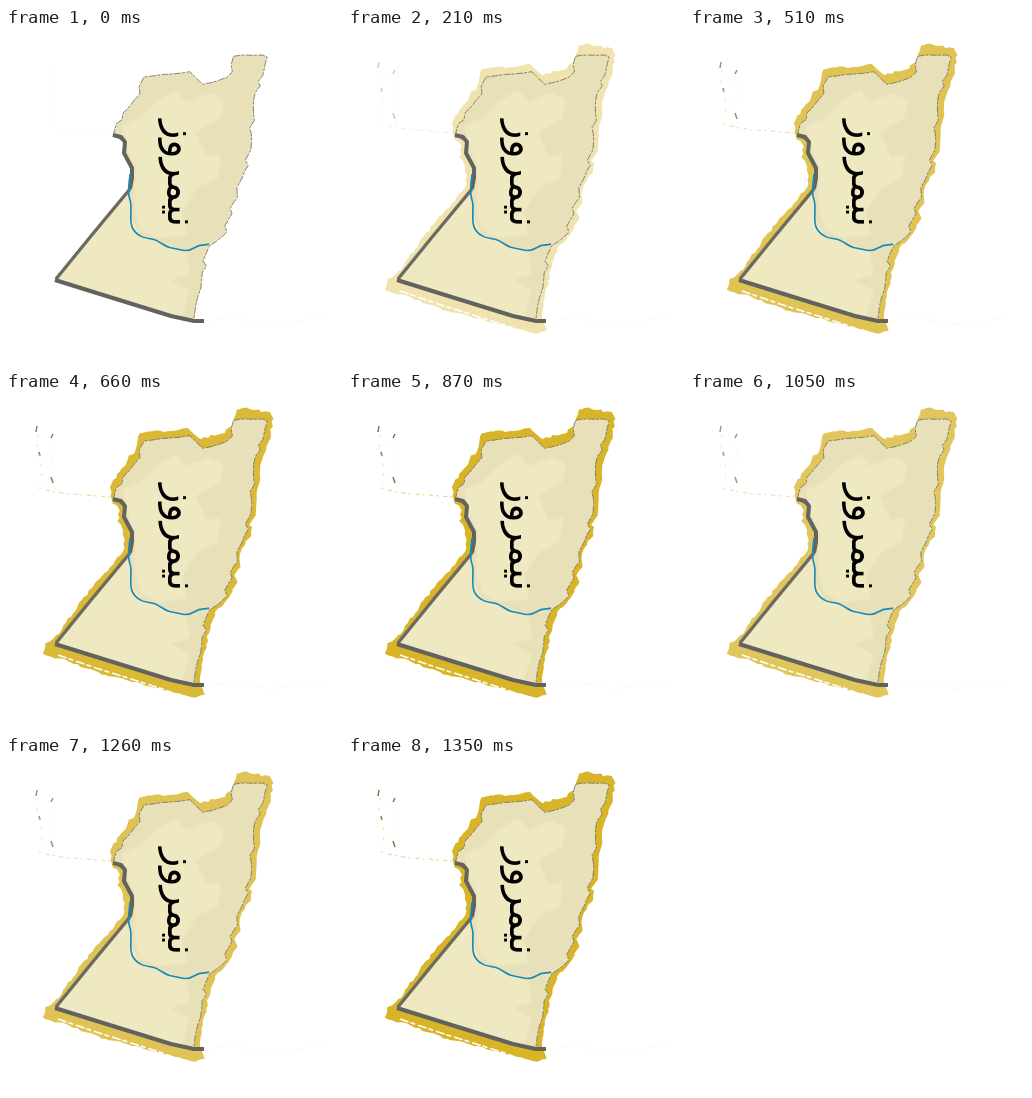
Animation, 336 px wide and 336 px high, one loop 1.42 s. Source, as an HTML page:

```html
<!DOCTYPE html>
<html lang="fa">
<head>
<meta charset="utf-8">
<style>
html, body { margin: 0; width: 100%; height: 100%; overflow: hidden; background: #fff; }
svg { display: block; width: 100vw; height: 100vh; }
text { font-family: "DejaVu Sans", sans-serif; font-size: 40px; }
</style>
</head>
<body>
<svg viewBox="0 0 336 336" fill="none" stroke-linejoin="round">
  <defs>
    <clipPath id="clip"><path class="land"/></clipPath>
    <filter id="soft"><feGaussianBlur stdDeviation="0.8"/></filter>
  </defs>
  <g stroke="#fbf9f2" stroke-width="1.2">
    <path d="M47 42L43 50L47 60L45 77L49 100L62 102L78 101L92 105L107 104" stroke-dasharray="5 4"/>
    <path d="M198 293L230 290L262 297L288 294L318 289" stroke-dasharray="8 5"/>
  </g>
  <g id="glow">
    <path id="halo" fill="#d8b428"/>
    <g stroke="#c9a53a" stroke-width="1.1">
      <path d="M31 34L30 40M47 42L45 46M33 60L34 64M45 85L47 91" stroke="#8d7440" stroke-width="1.5"/>
      <path d="M33 96L44 99L62 102L80 103L104 105" stroke="#ead592" stroke-dasharray="2 5 4 3"/>
      <path d="M32 42L31 56L36 76L35 92" stroke="#f0e2b6" stroke-dasharray="3 7"/>
    </g>
  </g>
  <path d="M52 263L90 276L125 287L160 298" stroke="#fff" stroke-width="1.6" stroke-dasharray="9 2 5 3"/>
  <path class="land" fill="#e8e0b8"/>
  <g clip-path="url(#clip)">
    <path d="M124 160L125 190L135 208L178 222L203 217L196 245L190 294L50 252Z" fill="#eee9c1"/>
    <path d="M116 98L135 90L150 74L170 62L180 74L204 65L218 72L214 90L190 104L201 129L215 125L212 150L191 160L176 184L181 207L152 210L135 202L128 180L130 142L121 120Z" fill="#eee9c1" filter="url(#soft)"/>
    <path d="M180 222L203 217L190 294L176 288L184 263L165 252L184 246Z" fill="#e8e0b6" filter="url(#soft)"/>
  </g>
  <path class="land" stroke="#7d7867" stroke-width="0.9" stroke-dasharray="7 1 3 1.5"/>
  <path d="M107 107L115 109L119 114L118 125L126 140L126 150L124 161" stroke="#64645f" stroke-width="4"/>
  <path d="M124 161L85 208L50 251" stroke="#6c6b62" stroke-width="3.4"/>
  <path d="M49 252L110 271L165 288L188 293L198 293" stroke="#62625e" stroke-width="4"/>
  <path d="M124 146C123 158 121 164 124 172S122 193 127 201S139 210 146 211S158 219 166 220S180 225 188 220S198 218 203 216" stroke="#1689b8" stroke-width="1.6"/>
  <text transform="translate(162 145.5) rotate(90)" text-anchor="middle" direction="rtl" fill="#000">نیمروز</text>
</svg>
<script>
const land = [228,28,240,27,256,27,261,29,259,36,257,47,252,54,254,58,249,64,247,80,248,92,244,100,246,112,245,122,239,132,242,137,236,150,231,160,231,170,224,180,226,186,219,198,221,204,215,210,203,218,197,233,200,238,196,245,195,260,191,270,188,293,165,288,110,271,50,251,85,208,124,161,126,140,118,125,119,114,107,107,110,96,116,92,117,85,134,66,133,58,138,49,165,46,184,44,190,50,197,56,210,53,220,50,226,44,225,36];
const rim = [105,96,110,85,116,77,124,64,130,58,134,41,158,39,182,36,188,42,194,46,205,44,218,40,226,34,230,18,240,16,264,21,267,26,264,46,256,66,254,86,250,100,249,124,244,132,246,140,235,160,234,175,228,182,231,190,221,210,210,220,204,234,200,256,196,268,193,290,198,302,192,306,150,296,100,283,60,269,36,262,40,252,50,244,76,208,106,172,118,160,118,142,112,130,113,118,105,108];
const LOOP = 1420, STEP = 30, LAST = 1350;
const PEAK = 870, DIP = 1170, LOW = 0.58;

let seed = 7;
const rand = () => (seed = seed * 16807 % 2147483647) / 2147483647 - 0.5;

// Splits each edge into short pieces and nudges them for a torn look.
function rough(pts, gap, amp) {
  const out = [], n = pts.length;
  for (let i = 0; i < n; i += 2) {
    const x = pts[i], y = pts[i + 1];
    const dx = pts[(i + 2) % n] - x, dy = pts[(i + 3) % n] - y;
    const k = Math.max(1, Math.round(Math.hypot(dx, dy) / gap));
    for (let j = 0; j < k; j++) {
      out.push((x + dx * j / k + rand() * amp).toFixed(1) + " " + (y + dy * j / k + rand() * amp).toFixed(1));
    }
  }
  return "M" + out.join("L") + "Z";
}

function strength(t) {
  if (t < PEAK) return Math.sin(t / PEAK * Math.PI / 2);
  if (t < DIP) return 1 - (1 - LOW) * (t - PEAK) / (DIP - PEAK);
  return LOW + (1 - LOW) * (t - DIP) / (LAST - DIP);
}

const glow = document.getElementById("glow");
function draw(now) {
  const t = Math.min(LAST, Math.floor(now % LOOP / STEP) * STEP);
  glow.setAttribute("opacity", strength(t).toFixed(3));
}

const shape = rough(land, 8, 1);
document.querySelectorAll(".land").forEach(p => p.setAttribute("d", shape));
document.getElementById("halo").setAttribute("d", rough(rim, 4, 2.4));

let start;
function tick(now) {
  start ??= now;
  draw(now - start);
  requestAnimationFrame(tick);
}
draw(0);
requestAnimationFrame(tick);
</script>
</body>
</html>
```
